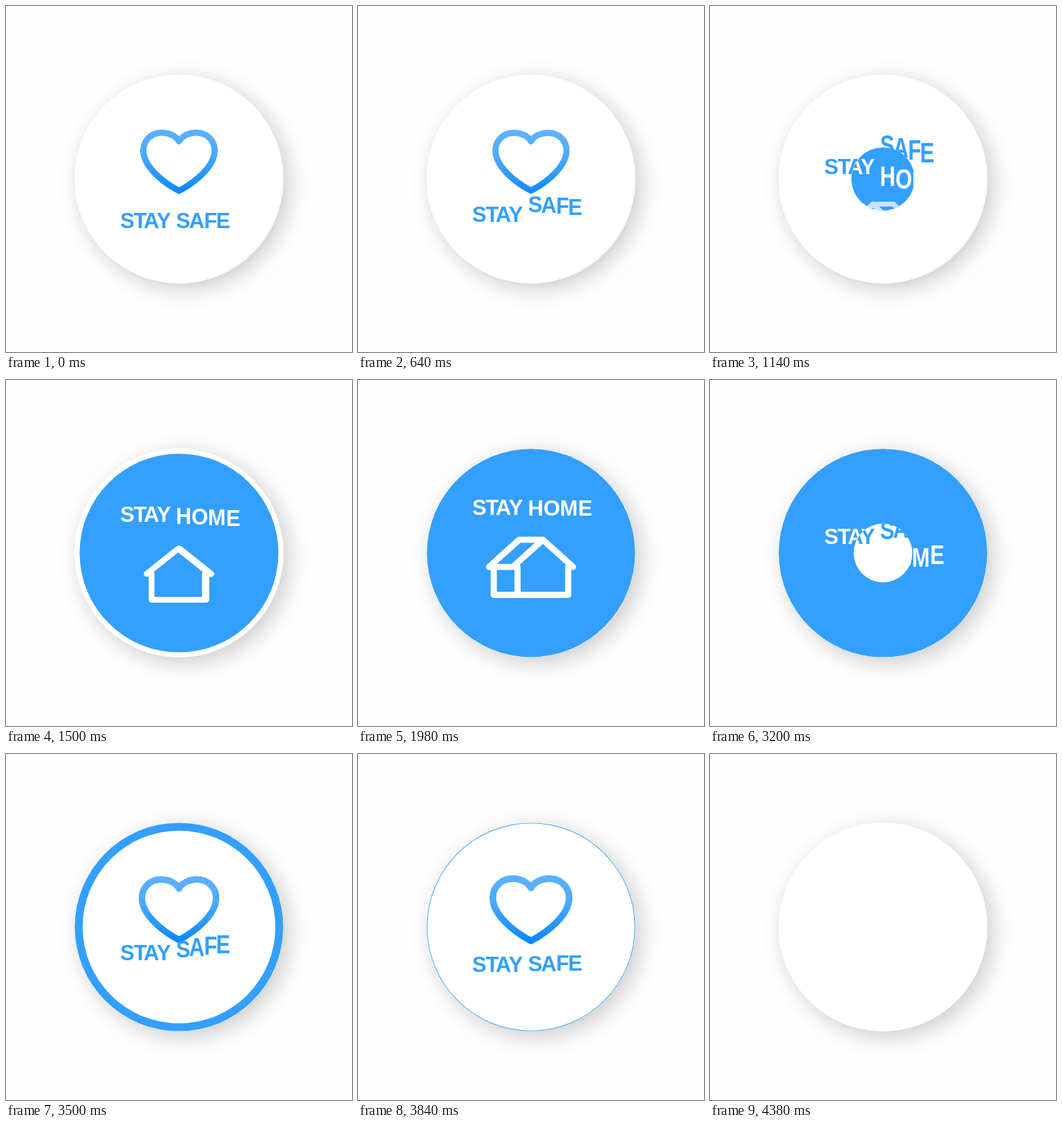
Write an HTML page with a canvas that moves like this. It is 500 px wide and 500 px high and loops after 4400 ms.

```html
<!DOCTYPE html>
<html lang="en">
<head>
<meta charset="utf-8">
<title>Stay safe, stay home</title>
<style>
html, body { margin: 0; width: 100%; height: 100%; overflow: hidden; background: #fefefe; }
canvas { display: block; width: 500px; height: 500px; }
</style>
</head>
<body>
<canvas id="stage" width="500" height="500"></canvas>
<script>
const ctx = document.getElementById('stage').getContext('2d');
const LOOP = 4400, HALF = LOOP / 2;
const BLUE = '#339fff', WHITE = '#fff';
const LOW = 310.5, HIGH = 184;
const CX = 250, RADIUS = 150.6;
const STAY = [['S', 175.3], ['T', 194], ['A', 210.2], ['Y', 228]];
const SAFE = [['S', 256], ['A', 275.8], ['F', 295.6], ['E', 313.8]];
const HOME = [['H', 256.8], ['O', 280], ['M', 304.6], ['E', 328.4]];

const clamp = v => Math.max(0, Math.min(1, v));
const progress = (t, start, length) => clamp((t - start) / length);
const easeOut = u => 1 - (1 - u) ** 3;

// Symmetric cubic-bezier(a, 0, 1 - a, 1)
function ease(x, a) {
  x = clamp(x);
  let lo = 0, hi = 1;
  for (let i = 0; i < 24; i++) {
    const s = (lo + hi) / 2, r = 1 - s;
    if (3 * a * s * r * r + 3 * (1 - a) * s * s * r + s ** 3 < x) lo = s;
    else hi = s;
  }
  return lo * lo * (3 - 2 * lo);
}

function disc(r) {
  ctx.beginPath();
  ctx.arc(CX, CX, r, 0, Math.PI * 2);
}

function letter(ch, x, y, stretch) {
  ctx.save();
  ctx.translate(x, y);
  ctx.scale(1, stretch);
  ctx.fillText(ch, 0, 10.7);
  ctx.restore();
}

// Vertical travel, mirrored for the second half of the loop
function travel(t) {
  const down = t >= HALF;
  const time = t % HALF + 15;
  const from = down ? HIGH : LOW, to = down ? LOW : HIGH;
  const dir = down ? 1 : -1;
  return {
    stay: from + (to - from) * ease(time / HALF, 0.8),
    enter(i) {
      const q = ease((time - 50 - 14 * i) / HALF, 0.8);
      return { y: from + (to - from) * q, q };
    },
    leave(i) {
      const q = ease((time - 16 * i) / HALF, 0.6);
      return { y: from + dir * 194 * q, q };
    }
  };
}

function drawText(word, place, stayY, color) {
  ctx.font = 'bold 31px "Liberation Sans", Arial, sans-serif';
  ctx.textAlign = 'center';
  ctx.fillStyle = color;
  STAY.forEach(([ch, x]) => letter(ch, x, stayY, 1));
  word.forEach(([ch, x], i) => {
    const { y, q } = place(i);
    letter(ch, x, y, 1 + 0.31 * (4 * q * (1 - q)) ** 2);
  });
}

function icon(y, scale, alpha, draw) {
  if (alpha <= 0 || scale <= 0) return;
  ctx.save();
  ctx.translate(CX, y);
  ctx.scale(scale, scale);
  ctx.globalAlpha = alpha;
  ctx.lineJoin = ctx.lineCap = 'round';
  ctx.beginPath();
  draw();
  ctx.stroke();
  ctx.restore();
}

function drawHeart(t) {
  let scale, alpha;
  if (t < HALF) {
    const out = progress(t, 560, 500);
    scale = (1 + 0.015 * Math.sin(Math.PI * progress(t, 0, 540))) * (1 - out ** 3);
    alpha = 1 - out * out;
  } else {
    const back = progress(t, 3840, 540);
    scale = 0.6 + 0.47 * easeOut(progress(t, 3260, 400));
    scale -= 0.035 * (1 - Math.cos(Math.PI * back));
    alpha = progress(t, 3260, 200);
  }
  icon(225, scale, alpha, () => {
    const fill = ctx.createLinearGradient(0, -47, 0, 47);
    fill.addColorStop(0, '#5cb2ff');
    fill.addColorStop(0.4, '#4aa9ff');
    fill.addColorStop(1, '#0786ff');
    ctx.strokeStyle = fill;
    ctx.lineWidth = 9;
    for (const m of [-1, 1]) {
      ctx.moveTo(0, 42);
      ctx.bezierCurveTo(25 * m, 29, 51.5 * m, 6, 51.5 * m, -16);
      ctx.bezierCurveTo(51.5 * m, -31, 40 * m, -42, 25 * m, -42);
      ctx.bezierCurveTo(14 * m, -42, 4 * m, -37, 0, -29.5);
    }
  });
}

function drawHouse(t, stayY) {
  const out = progress(t, 2700, 450);
  const scale = (1 - 0.23 * Math.exp(-(t - 1140) / 490)) * (1 - out ** 3);
  const alpha = progress(t, 1090, 70) * (1 - out * out);
  const turn = Math.min(1, (t - 1140) / 1420);
  const angle = (30 - 72 * Math.sin(turn * Math.PI / 2)) * Math.PI / 180;
  const depth = 77 * Math.sin(angle), side = Math.sign(depth) || 1;
  const wall = 43.2 * Math.cos(angle) * side;
  const eave = 51.3 * Math.cos(angle) * side;
  const front = -depth / 2, back = depth / 2;
  const top = -41.5, mid = -0.5, base = 41.5;
  const line = (...pts) => pts.forEach(([x, y], i) => i ? ctx.lineTo(x, y) : ctx.moveTo(x, y));
  icon(stayY + 86, scale, alpha, () => {
    ctx.strokeStyle = WHITE;
    ctx.lineWidth = 9.3;
    line([front - eave, mid], [front, top], [front + eave, mid]);
    line([front, top], [back, top], [back + eave, mid], [front + eave, mid]);
    line([front - wall, mid], [front - wall, base], [back + wall, base], [back + wall, mid]);
    line([front + wall, mid], [front + wall, base]);
  });
}

function drawLayer(isHome, t, r) {
  if (r <= 0) return;
  const path = travel(t);
  const entering = isHome === (t < HALF);
  ctx.save();
  disc(r);
  ctx.fillStyle = isHome ? BLUE : WHITE;
  ctx.fill();
  ctx.clip();
  if (isHome) drawHouse(t, path.stay);
  else drawHeart(t);
  drawText(isHome ? HOME : SAFE, entering ? path.enter : path.leave, path.stay, isHome ? WHITE : BLUE);
  ctx.restore();
}

function drawPlate() {
  ctx.fillStyle = '#fefefe';
  ctx.fillRect(0, 0, 500, 500);
  ctx.save();
  ctx.shadowColor = 'rgba(0,0,0,0.2)';
  ctx.shadowBlur = 32;
  ctx.shadowOffsetX = ctx.shadowOffsetY = 8;
  ctx.fillStyle = WHITE;
  disc(151);
  ctx.fill();
  ctx.restore();
}

const reveal = (t, start) => t > start ? RADIUS * (1 - Math.exp((start - t) / 133)) : 0;

function render(t) {
  drawPlate();
  if (t >= 4378) return;
  const first = t < HALF;
  drawLayer(!first, t, RADIUS);
  drawLayer(first, t, reveal(t, first ? 1093 : 3157));
}

const begin = performance.now();
function tick() {
  render((performance.now() - begin) % LOOP);
  requestAnimationFrame(tick);
}
render(0);
requestAnimationFrame(tick);
</script>
</body>
</html>
```
